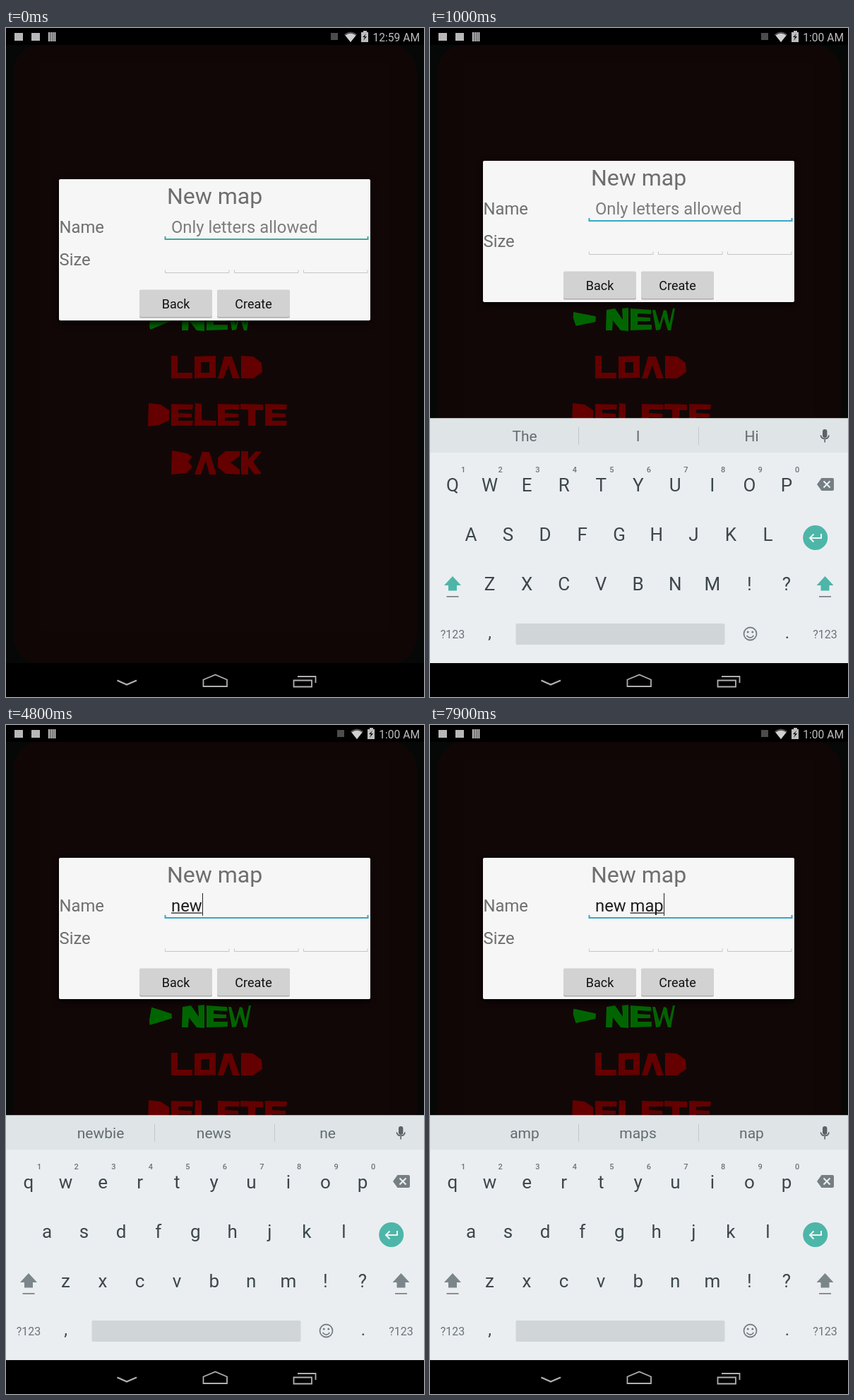
Write an HTML page with a canvas that moves like this. It is 592 px wide and 947 px high and loops after 8000 ms.

```html
<!DOCTYPE html>
<html lang="en">
<head>
<meta charset="utf-8">
<title>New map</title>
<style>
html, body { margin: 0; width: 100%; height: 100%; overflow: hidden; background: #000; }
canvas { display: block; width: 592px; height: 947px; }
</style>
</head>
<body>
<canvas id="stage" width="592" height="947"></canvas>
<script>
const ctx = document.getElementById('stage').getContext('2d');
const LOOP = 8000, STEP = 100;
const GREEN = '#006500', RED = '#640000', TEAL = '#4db6a9';

// time, finished text, word being typed, suggestions
const STATES = [
  [0, '', '', 'The I Hi'],
  [100, '', '', 'The I Hi'],
  [1900, '', '', 'Ne B No'],
  [3400, '', 'n', 'in not no'],
  [4100, '', 'ne', 'me new ne'],
  [4700, '', 'new', 'newbie news ne'],
  [5500, 'new ', '', 'one and to'],
  [6200, 'new ', 'm', 'members member messages'],
  [6900, 'new ', 'ma', 'making may made'],
  [7600, 'new ', 'map', 'amp maps nap']
];
const PRESSES = [[1800, 'N'], [3300, 'n'], [4000, 'e'], [4600, 'w'], [5400, ' '], [6100, 'm'], [6800, 'a'], [7500, 'p']];
const ROWS = [
  { keys: 'qwertyuiop', x: 32, y: 647 },
  { keys: 'asdfghjkl', x: 58, y: 717 },
  { keys: 'zxcvbnm!?', x: 84.5, y: 787 }
];
const PITCH = 52.55;

const MENU = [
  [GREEN, 'M250 399L262 397 273 413 272 397 281 396 281 429 270 428 259 414 258 428 249 428Z',
    'M284 397L313 399 313 405 294 404 294 409 312 410 312 415 294 415 294 420 314 420 314 427 284 428Z',
    'M315 399L319 399 325 420 331 399 335 400 339 419 344 397 347 397 341 428 337 428 331 409 326 427 320 428Z'],
  [RED, 'M234 464H243V488H264V496H234Z',
    'M267 465L297 464 297 495 267 496ZM276 473V488H288V473Z',
    'M309 465H320L331 496H321L315 477 308 496H300Z',
    'M333 464L350 465 362 474 363 487 350 496H333Z'],
  [RED, 'M202 531L219 533 231 541V555L217 562 201 564Z',
    'M268 531L277 532V555L298 556 297 563H267Z',
    'M332 532L364 533V541H353V563H343V540H332Z'],
  [RED, 'M235 598L256 602 264 607 258 614 264 621 256 630 234 632Z',
    'M278 600H288L298 632H288L283 612 276 632H267Z',
    'M300 608L311 599H331V606L318 615 331 625V632L311 631 300 622Z',
    'M333 599H343V610L354 599 362 600 350 614 362 631 352 632 343 620V632H333Z']
];
const LETTER_E = 'M0 0L31 1 30 8 10 8 10 13 29 14 29 19 10 19 10 24 31 24 30 31 0 31Z';

function rect(x, y, w, h, color, r = 0) {
  ctx.fillStyle = color;
  ctx.beginPath();
  ctx.roundRect(x, y, w, h, r);
  ctx.fill();
}

function shape(d, color) {
  ctx.fillStyle = color;
  ctx.fill(new Path2D(d), 'evenodd');
}

function line(d, color, width = 1) {
  ctx.strokeStyle = color;
  ctx.lineWidth = width;
  ctx.stroke(new Path2D(d));
}

function disc(x, y, r, color) {
  ctx.fillStyle = color;
  ctx.beginPath();
  ctx.arc(x, y, r, 0, 7);
  ctx.fill();
}

function text(s, x, y, size, color, align = 'center', weight = 400) {
  ctx.font = `${weight} ${size}px Roboto, sans-serif`;
  ctx.textAlign = align;
  ctx.fillStyle = color;
  ctx.fillText(s, x, y);
}

function at(dx, dy, draw) {
  ctx.save();
  ctx.translate(dx, dy);
  draw();
  ctx.restore();
}

function drawArrow(t) {
  const a = (-35 - 0.0785 * t) * Math.PI / 180;
  const project = (x, y, z) => {
    const s = 650 / (650 + y * Math.sin(a) + z * Math.cos(a));
    return [296 + x * s, 412 + (y * Math.cos(a) - z * Math.sin(a)) * s];
  };
  const face = z => [project(-91, -15, z), project(-91, 15, z), project(-61.5, 0, z)];
  const near = face(-4), far = face(4);
  const faces = [near, far];
  for (let i = 0; i < 3; i++) {
    const j = (i + 1) % 3;
    faces.push([near[i], near[j], far[j], far[i]]);
  }
  for (const pts of faces) shape('M' + pts.map(p => p.join(' ')).join('L') + 'Z', GREEN);
}

function drawGame(t) {
  rect(0, 24, 592, 876, '#060808');
  rect(10, 22, 572, 880, '#110606', 42);
  rect(48, 48, 496, 806, '#120707', 6);
  for (const [color, ...glyphs] of MENU) glyphs.forEach(d => shape(d, color));
  for (const x of [234, 300, 367]) at(x, 532, () => shape(LETTER_E, RED));
  drawArrow(t);
}

function drawStatus(t) {
  rect(0, 0, 592, 24, '#000');
  rect(12, 7, 12, 11, '#b8b8b8');
  rect(36, 7, 12, 11, '#b8b8b8');
  for (let i = 0; i < 4; i++) rect(60 + i * 2.8, 6, 2, 13, '#c4c4c4');
  const late = t >= 600;
  at(late ? 9 : 0, 0, () => {
    rect(460, 7, 10, 10, '#4c4c4c');
    shape('M479 9Q488 2 497 9L488 20Z', '#555');
    shape('M480.5 10.5Q488 5 495.5 10.5L488 20Z', '#d0d0d0');
    shape('M503 6H506V4H511V6H513V20H503Z', '#bdbdbd');
    shape('M510 8L505 13H508L506 18 511 12H508Z', '#111');
  });
  text(late ? '1:00 AM' : '12:59 AM', 586, 18.5, 15.6, '#bebebe', 'right');
}

function drawNav() {
  rect(0, 899, 592, 48, '#000');
  line('M157.5 923.5L171 929.5 185 923.5', '#b0b0b0', 2.4);
  line('M279.5 932V922.5L296.5 915.5 313 922.5V932Z', '#b0b0b0', 1.8);
  line('M407.5 923.5H433V932.5H407.5ZM413 918H438.5V927', '#b0b0b0', 1.8);
}

function bracket(x1, x2, y, color, width) {
  line(`M${x1 + .5} ${y - 4}V${y}H${x2 - .5}V${y - 4}`, color, width);
}

function button(label, x) {
  rect(x, 345, 103, 39.5, '#aaa', 2);
  rect(x, 344.5, 103, 38.5, '#d2d2d2', 2);
  text(label, x + 51.5, 371, 18, '#111');
}

function drawDialog(t, state) {
  const [start, done, word] = state;
  const focused = t >= 100;
  ctx.save();
  ctx.shadowColor = '#000';
  ctx.shadowBlur = 8;
  ctx.shadowOffsetY = 3;
  rect(75, 188, 441, 200, '#f6f6f6', 2);
  ctx.restore();
  text('New map', 295.5, 223, 32, '#6e6e6e');
  text('Name', 75.5, 263.5, 23.8, '#6e6e6e', 'left');
  text('Size', 75.5, 310, 23.8, '#6e6e6e', 'left');
  bracket(225, 513, 273, focused ? '#36a7c9' : '#3fa7a0', 2);
  for (const x of [225, 323, 421]) bracket(x, x + 91.5, 320.5, '#c6c6c6', 1);
  button('Back', 189);
  button('Create', 299);

  let caret = 234;
  if (done + word) {
    text(done + word, 234, 263.5, 23.8, '#1c1c1c', 'left');
    const from = 234 + ctx.measureText(done).width;
    caret = 234 + ctx.measureText(done + word).width;
    if (word) rect(from, 265.5, caret - from, 1.3, '#1c1c1c');
  } else {
    text('Only letters allowed', 234, 263.5, 23.8, '#7c7c7c', 'left');
  }
  if (focused && Math.floor((t - start) / 500) % 2 === 0) rect(Math.round(caret), 238, 1, 32, '#222');
}

function shiftKey(x, caps) {
  shape(`M${x} 776L${x + 12} 789H${x + 6}V796.5H${x - 6}V789H${x - 12}Z`, caps ? TEAL : '#7b868a');
  rect(x - 8.5, 804, 17, 1.8, '#7b868a');
}

function drawPopup(label, x, y) {
  ctx.save();
  ctx.shadowColor = 'rgba(0,0,0,.3)';
  ctx.shadowBlur = 4;
  ctx.shadowOffsetY = 1;
  rect(x - 22, y - 80, 44, 106, '#eef1f3', 2);
  ctx.restore();
  text(label, x, y - 42, 30, '#37424a');
}

function drawKeys(t, words) {
  const caps = t < 1900;
  const ink = '#3c474c', soft = '#6a7478';
  const press = PRESSES.find(p => t >= p[0] && t < p[0] + 100);
  const pressed = press ? press[1] : '';
  let popup = null;

  rect(0, 552.5, 592, 347, '#ebeef1');
  rect(0, 552.5, 592, 48.5, '#dfe4e6');
  words.forEach((s, i) => text(s, [134, 294.5, 455.5][i], 585, 21, '#626c70'));
  rect(210, 565, 1, 25, '#c2c8cb');
  rect(380, 565, 1, 25, '#c2c8cb');

  rect(556, 568, 6.4, 12, '#596266', 3.2);
  line('M553.3 576.5A6 6 0 0 0 565.1 576.5M559.2 582.5V586.5', '#596266', 1.6);

  for (const { keys, x, y } of ROWS) {
    [...keys].forEach((key, i) => {
      const label = caps ? key.toUpperCase() : key;
      const cx = x + i * PITCH;
      if (label === pressed) popup = [label, cx, y];
      text(label, cx, y + 9.2, 26, ink);
      if (y === 647) text((i + 1) % 10, cx + 15.2, 629, 11, soft, 'center', 500);
    });
  }

  shape('M548 646L554.5 637H570Q572 637 572 639V653Q572 655 570 655H554.5Z', '#757f83');
  line('M557.5 641.5L566.5 650.5M566.5 641.5L557.5 650.5', '#eef1f3', 2);
  disc(545.7, 721.5, 17.5, TEAL);
  line('M554 716V722H538M543.5 716.5L538 722 543.5 727.5', '#eef6f5', 2);
  shiftKey(32, caps);
  shiftKey(559.5, caps);

  text('?123', 32, 864, 16, soft);
  text('?123', 559.5, 864, 16, soft);
  text(',', 84.5, 864, 24, ink);
  text('.', 506, 864, 24, ink);
  rect(121.5, 843, 296, 30, pressed === ' ' ? '#b6bdc1' : '#d0d5d8', 2);
  line('M444.5 857.5A9 9 0 1 0 462.5 857.5A9 9 0 1 0 444.5 857.5ZM448.5 860Q453.5 866 458.5 860', '#757f83', 1.8);
  disc(450.2, 855, 1.5, '#757f83');
  disc(456.8, 855, 1.5, '#757f83');
  if (popup) drawPopup(...popup);
}

function drawKeyboard(t, words) {
  if (t < 100) return;
  const rest = 1 - Math.min(1, (t - 100) / 200);
  ctx.save();
  ctx.beginPath();
  ctx.rect(0, 24, 592, 875);
  ctx.clip();
  ctx.globalAlpha = 1 - Math.pow(rest, 3.3);
  at(0, 28 * rest * rest, () => drawKeys(t, words));
  ctx.restore();
}

function render(t) {
  const state = STATES.filter(s => s[0] <= t).pop();
  drawGame(t);
  at(0, t < 100 ? 26 : 0, () => drawDialog(t, state));
  drawKeyboard(t, state[3].split(' '));
  drawStatus(t);
  drawNav();
}

let begin;
function tick(now) {
  if (begin === undefined) begin = now;
  const t = (now - begin) % LOOP;
  render(Math.floor(t / STEP) * STEP);
  requestAnimationFrame(tick);
}
render(0);
requestAnimationFrame(tick);
</script>
</body>
</html>
```
